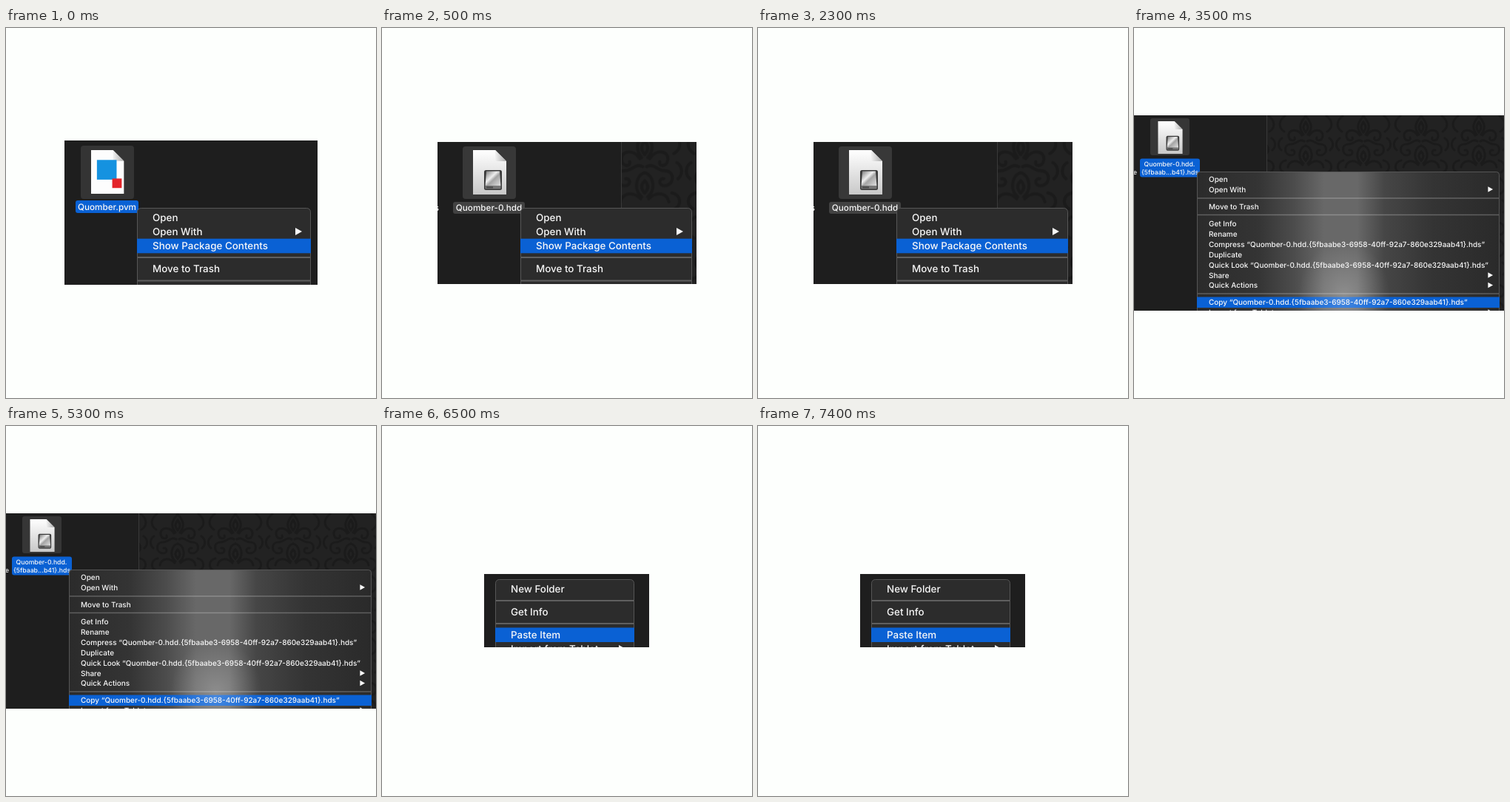
An HTML page for the animation above (8000 ms loop, 500 by 500 pixels).

```html
<!DOCTYPE html>
<html lang="en">
<head>
<meta charset="utf-8">
<title>Menu steps</title>
<style>
  html, body { margin: 0; width: 100%; height: 100%; overflow: hidden; background: #fdfffd; }
  svg { display: block; width: 100vw; height: 100vh; }
  text { font-family: Inter, Roboto, sans-serif; font-weight: 500; fill: #f8f8f8; text-rendering: geometricPrecision; }
</style>
</head>
<body>
<svg id="stage" viewBox="0 0 500 500"></svg>
<script>
const BLUE = '#0a61d4';
const NAME = 'Quomber';
const DISK = NAME + '-0.hdd';
const FULL = `“${DISK}.{5fbaabe3-6958-40ff-92a7-860e329aab41}.hds”`;

const rect = (x, y, w, h, fill, r = 0, extra = '') =>
  `<rect x="${x}" y="${y}" width="${w}" height="${h}" rx="${r}" fill="${fill}" ${extra}/>`;

const text = (x, y, size, str, anchor = 'start') =>
  `<text x="${x}" y="${y}" font-size="${size}" text-anchor="${anchor}">${str}</text>`;

const arrow = (x, y, s) =>
  `<path d="M${x} ${y - 5 * s}l${9 * s} ${5 * s}l${-9 * s} ${5 * s}z" fill="#f8f8f8"/>`;

// Items are [centre y, label, has submenu]; the panel clips the lower end.
function menu({ x, y, w, textX, size, items, lines, pick, fill = '#2c2c2c' }) {
  const s = size / 13.4;
  const bar = 2 * s;
  return rect(x + .5, y + .5, w - 1, 250, fill, 5 * s, 'stroke="#565656"') +
    lines.map(ly => rect(x + 1, ly - bar / 2, w - 2, bar, '#fff', 0, 'opacity=".24"')).join('') +
    rect(x, pick[0], w, pick[1], BLUE) +
    items.map(([cy, label, sub]) =>
      text(textX, cy + .36 * size, size, label) + (sub ? arrow(x + w - 21 * s, cy, s) : '')).join('');
}

// Blank document, 45 by 60 units
const page = fill => `<path d="M0 0H30L45 15V60H0z" fill="${fill}"/>
  <path d="M30 0V15H45z" fill="url(#fold)"/>`;

const drive = page('url(#paper)') + `<g transform="translate(15 27)">
  <rect width="24" height="27" rx="2.5" fill="#3a3a3a"/>
  <path d="M3 1.5H21L22.5 21.5H1.5z" fill="url(#metal)"/>
  <rect x="1.5" y="21.5" width="21" height="4" rx="1" fill="#777"/>
  <rect x="3" y="22.3" width="9" height="2.2" fill="#4b4b4b"/></g>`;

const badges = page('#fdfdfd') + rect(8, 13.5, 27, 27, '#1592e0') + rect(29, 39, 13, 13, '#e3262b');

const icon = (x, y, s, art) => `<g transform="translate(${x} ${y}) scale(${s})">${art}</g>`;

// Right half of the wallpaper ornament, drawn as fine scrolls
const half = `<path d="M0-36C8-27 10-20 3-11M0-28C4-22 4-19 0-14M5-10C11-20 24-18 23-9C22-1 13-2 15-7
  M2-2C9-6 12 2 20 2C30 2 30 16 20 17C13 17 14 9 19 10M0 4C8 6 12 20 3 28M0 12C4 16 4 20 0 24
  M4 30C12 22 22 24 24 33M28-36C37-30 37-20 29-15M32-6C38-2 38 6 33 10M27 24C36 26 37 36 30 40"/>`;

const damask = (id, x, y, s) =>
  `<pattern id="${id}" width="78" height="84" patternUnits="userSpaceOnUse"
    patternTransform="translate(${x} ${y}) scale(${s})">
    <rect width="78" height="84" fill="#222"/>
    <g fill="none" stroke="#1b1b1b" stroke-width="3.2" stroke-linecap="round">
    <g transform="translate(39 42)">${half}</g>
    <g transform="translate(39 42) scale(-1 1)">${half}</g></g></pattern>`;

const grad = (id, dir, stops) =>
  `<linearGradient id="${id}" ${dir}>` +
  stops.map(([at, color]) => `<stop offset="${at}" stop-color="${color}"/>`).join('') + '</linearGradient>';

const defs = `<defs>
  ${grad('paper', 'x2="0" y2="1"', [[0, '#fff'], [1, '#c8c8c8']])}
  ${grad('fold', 'x2="1" y2="0"', [[0, '#f2f2f2'], [1, '#a9a9a9']])}
  ${grad('metal', 'x2="1" y2="1"', [[0, '#777'], [.4, '#eee'], [.55, '#a4a4a4'], [1, '#e2e2e2']])}
  ${grad('glow', 'x2="1" y2="0"', [[0, '#2b2b2b'], [.2, '#343434'], [.32, '#4c4c4c'], [.42, '#686868'],
    [.53, '#686868'], [.62, '#464646'], [.78, '#343434'], [1, '#2a2a2a']])}
  <radialGradient id="shine"><stop stop-color="#fff" stop-opacity=".25"/>
    <stop offset="1" stop-color="#fff" stop-opacity="0"/></radialGradient>
  ${damask('wallBig', 302, 133, 1.36)}${damask('wall', 193, 113, 1)}</defs>`;

let clips = 0;
function panel(x, y, w, h, body) {
  const id = 'clip' + clips++;
  return `<g class="scene"><clipPath id="${id}">${rect(x, y, w, h, '#000')}</clipPath>
    <g clip-path="url(#${id})">${rect(x, y, w, h, '#1e1e1e')}${body}</g></g>`;
}

const fileItems = [[256, 'Open'], [275, 'Open With', true], [294, 'Show Package Contents'], [325, 'Move to Trash']];
const fileMenu = (x, w) => menu({
  x, y: 243, w, textX: x + 21, size: 13.4,
  items: fileItems, lines: [310, 341.5], pick: [284.7, 19.6]
});

const scenes = [
  panel(79, 152, 342, 195,
    rect(101, 159, 72, 72, '#343434', 4) + icon(115, 165, .985, badges) +
    rect(94, 233, 85, 17, BLUE, 3) + text(136.5, 246, 11.7, NAME + '.pvm', 'middle') +
    fileMenu(177, 235)),

  panel(75, 154, 350, 192,
    rect(324, 154, 101, 192, 'url(#wallBig)') + rect(323, 154, 1, 192, '#393939') +
    rect(109, 160, 72, 71, '#383838', 4) + icon(123, 165, 1, drive) +
    text(77, 247, 11.7, 's', 'end') +
    rect(96, 235, 97, 16, '#424242', 3) + text(144.5, 247, 11.7, DISK, 'middle') +
    fileMenu(187, 232)),

  panel(0, 118, 500, 264,
    rect(180, 118, 320, 264, 'url(#wall)') + rect(179, 118, 1, 264, '#393939') +
    rect(22, 122, 53, 50, '#363636', 3) + icon(32.5, 126, .735, drive) +
    text(4, 198, 8.6, 'e', 'end') +
    rect(8, 176.5, 81, 25, BLUE, 3) + text(48, 186.5, 8.7, DISK + '.', 'middle') +
    text(48.5, 198.3, 8.7, '{5fbaab...b41}.hds', 'middle') +
    menu({
      x: 85, y: 194, w: 409, textX: 101, size: 9.97, fill: 'url(#glow)',
      items: [
        [204, 'Open'], [218, 'Open With', true], [241, 'Move to Trash'],
        [264, 'Get Info'], [278, 'Rename'], [292, 'Compress ' + FULL], [306, 'Duplicate'],
        [320, 'Quick Look ' + FULL], [334, 'Share', true], [347.5, 'Quick Actions', true],
        [370.5, 'Copy ' + FULL], [384, 'Import from Tablet', true]
      ],
      lines: [230, 252.5, 359], pick: [363.5, 14.5]
    }).replace('<text', '<ellipse cx="284" cy="362" rx="62" ry="75" fill="url(#shine)"/><text')),

  panel(138, 200, 223, 99,
    menu({
      x: 153, y: 207, w: 188, textX: 174, size: 13.4,
      items: [[220, 'New Folder'], [251, 'Get Info'], [282, 'Paste Item'], [301, 'Import from Tablet', true]],
      lines: [236, 267], pick: [272.5, 19.5]
    }))
];

const stage = document.getElementById('stage');
stage.innerHTML = defs + rect(0, 0, 500, 500, '#fdfffd') + scenes.join('');
const groups = [...stage.querySelectorAll('.scene')];
const ends = [500, 3500, 6500, 8000];

function draw(ms) {
  const now = ends.findIndex(end => ms % 8000 < end);
  groups.forEach((g, i) => g.setAttribute('visibility', i === now ? 'visible' : 'hidden'));
}

const start = performance.now();
function tick() {
  draw(performance.now() - start);
  requestAnimationFrame(tick);
}
tick();
</script>
</body>
</html>
```
